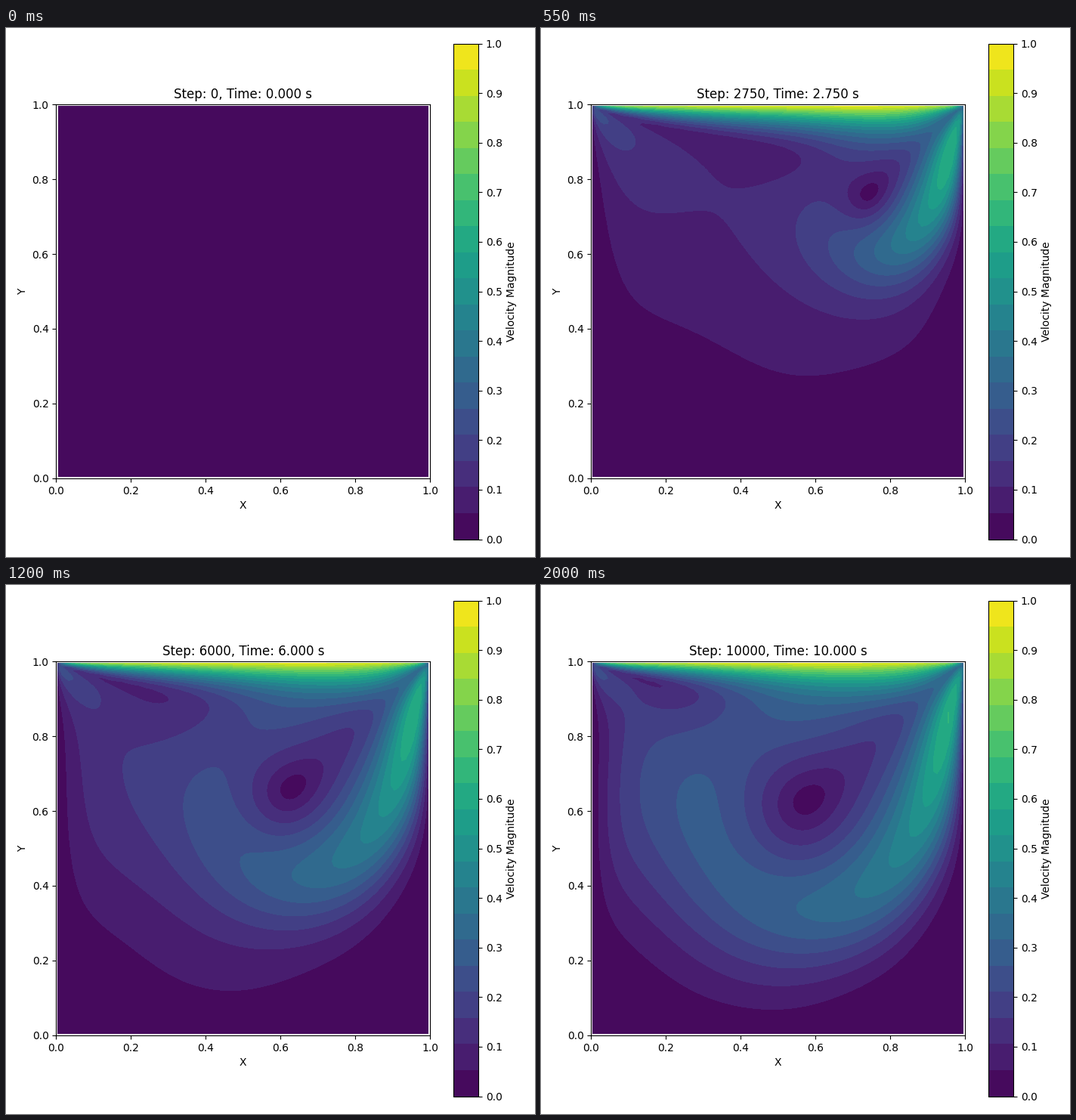
Write a matplotlib script that moves like this. It is 700 px wide and 700 px high and loops after 2050 ms.

```python
import numpy as np
import matplotlib.pyplot as plt
from matplotlib.animation import FuncAnimation

# Lid-driven cavity on a staggered grid: u is (N, N+1), v is (N+1, N), rows run in y.
N = 100
H = 1 / N
NU = 1 / 400
LID = 1.0
DT = 0.0025
FRAMES = 41
FRAME_TIME = 0.25
STEPS_PER_FRAME = 250

k = np.arange(N)
Q = np.cos(np.pi * np.outer(k + 0.5, k) / N) * np.sqrt(2 / N)
Q[:, 0] /= np.sqrt(2)
QT = np.ascontiguousarray(Q.T)
eig = (2 * np.cos(np.pi * k / N) - 2) / H**2
lam = eig[:, None] + eig[None, :]
lam[0, 0] = 1
INV = 1 / lam
INV[0, 0] = 0


def forces(u, v):
    """Advection and diffusion at the interior faces."""
    ug = np.vstack((-u[:1], u, 2 * LID - u[-1:]))
    vg = np.hstack((-v[:, :1], v, -v[:, -1:]))
    uc = 0.5 * (u[:, 1:] + u[:, :-1])
    vc = 0.5 * (v[1:] + v[:-1])
    uv = 0.25 * (ug[1:] + ug[:-1]) * (vg[:, 1:] + vg[:, :-1])
    lap_u = u[:, 2:] + u[:, :-2] + ug[2:, 1:-1] + ug[:-2, 1:-1] - 4 * u[:, 1:-1]
    lap_v = v[2:] + v[:-2] + vg[1:-1, 2:] + vg[1:-1, :-2] - 4 * v[1:-1]
    uu, vv = uc * uc, vc * vc
    fu = NU / H**2 * lap_u - (uu[:, 1:] - uu[:, :-1] + uv[1:, 1:-1] - uv[:-1, 1:-1]) / H
    fv = NU / H**2 * lap_v - (vv[1:] - vv[:-1] + uv[1:-1, 1:] - uv[1:-1, :-1]) / H
    return fu, fv


def project(u, v):
    """Remove the divergence in place."""
    div = (u[:, 1:] - u[:, :-1] + v[1:] - v[:-1]) / H
    p = Q @ ((QT @ div @ Q) * INV) @ QT
    u[:, 1:-1] -= (p[:, 1:] - p[:, :-1]) / H
    v[1:-1] -= (p[1:] - p[:-1]) / H


def speed(u, v):
    return np.hypot(0.5 * (u[:, 1:] + u[:, :-1]), 0.5 * (v[1:] + v[:-1]))


def simulate():
    u, v = np.zeros((N, N + 1)), np.zeros((N + 1, N))
    fields = [speed(u, v)]
    last = None
    for _ in range(FRAMES - 1):
        for _ in range(round(FRAME_TIME / DT)):
            fu, fv = forces(u, v)
            pu, pv = last or (fu, fv)
            u[:, 1:-1] += DT * (1.5 * fu - 0.5 * pu)
            v[1:-1] += DT * (1.5 * fv - 0.5 * pv)
            last = fu, fv
            project(u, v)
        fields.append(speed(u, v))
    return fields


fields = simulate()
centers = (k + 0.5) * H
levels = np.linspace(0, 1, 20)

fig, ax = plt.subplots(figsize=(7, 7), dpi=100)


def fill(i):
    ax.set_title(f"Step: {i * STEPS_PER_FRAME}, Time: {i * FRAME_TIME:.3f} s")
    return ax.contourf(centers, centers, fields[i], levels=levels,
                       cmap="viridis", vmin=0, vmax=1)


contours = fill(0)
bar = fig.colorbar(contours, ax=ax, ticks=np.linspace(0, 1, 11))
bar.set_label("Velocity Magnitude")
ax.set(xlim=(0, 1), ylim=(0, 1), xlabel="X", ylabel="Y", aspect="equal")
fig.tight_layout()


def draw(i):
    global contours
    contours.remove()
    contours = fill(i)
    return []


anim = FuncAnimation(fig, draw, frames=FRAMES, interval=50, repeat=True)
plt.show()
```
